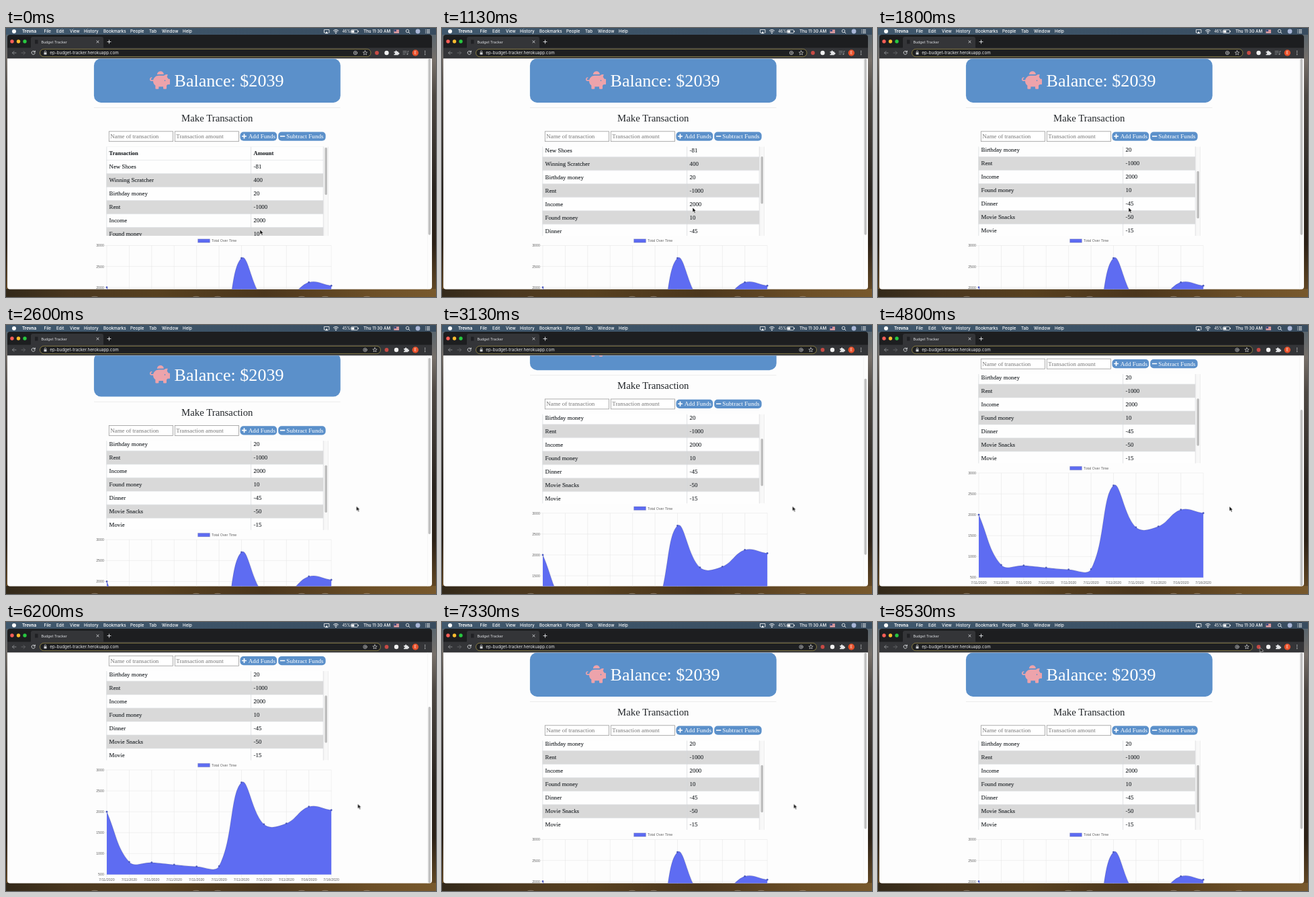
An HTML page for the animation above (8600 ms loop, 640 by 400 pixels).

```html
<!DOCTYPE html>
<html lang="en">
<head>
<meta charset="utf-8">
<title>Budget Tracker</title>
<style>
@property --page { syntax: "<number>"; inherits: true; initial-value: 0; }
@property --list { syntax: "<number>"; inherits: true; initial-value: 0; }

html, body { margin: 0; width: 100%; height: 100%; overflow: hidden; background: #2c2418; }
svg { display: block; width: 640px; height: 400px; }
text { white-space: pre; }

#stage { animation: page 8.6s linear infinite, list 8.6s linear infinite; }
#page { transform: translateY(calc(var(--page) * -1px)); }
#pageThumb { transform: translateY(calc(var(--page) * .777px)); }
#rows { transform: translateY(calc(var(--list) * -1px)); }
#listThumb { transform: translateY(calc(var(--list) * .538px)); }
#cursor { animation: cursor 8.6s linear infinite; }
.early { animation: early 8.6s step-end infinite; }
.late { animation: late 8.6s step-end infinite; }

@keyframes page {
  0%, 29.42% { --page: 0; }
  33.26% { --page: 20; }
  34.88% { --page: 30; }
  36.4% { --page: 43.7; }
  37.9% { --page: 59; }
  40.23%, 41.86% { --page: 64; }
  44.88% { --page: 81; }
  48.84% { --page: 100; }
  51.86%, 79.77% { --page: 103.5; animation-timing-function: ease-out; }
  84.42%, 100% { --page: 0; }
}
@keyframes list {
  0%, 10.81% { --list: 0; animation-timing-function: ease-out; }
  20.12%, 100% { --list: 65; }
}
@keyframes cursor {
  0%, .7% { transform: translate(378px, 300px); }
  4.65%, 20.93% { transform: translate(373px, 267px); animation-timing-function: ease-in-out; }
  26.28%, 36.4% { transform: translate(521.5px, 269.5px); }
  39.5%, 63.5% { transform: translate(523px, 269.7px); }
  69%, 89.88% { transform: translate(523.5px, 270.5px); animation-timing-function: ease-in-out; }
  99.19%, 100% { transform: translate(568.5px, 38px); }
}
@keyframes early { 0% { visibility: visible; } 29.42%, 100% { visibility: hidden; } }
@keyframes late { 0% { visibility: hidden; } 29.42%, 100% { visibility: visible; } }

.ui { font-family: Inter, Roboto, sans-serif; font-size: 6.25px; }
.ui .small { font-size: 5.5px; }
.serif { font-family: "Liberation Serif", "Times New Roman", serif; font-size: 8.9px; fill: #212529; }
#rows text { stroke: #212529; stroke-width: .12; }
.chart { font-family: "Liberation Sans", Arial, sans-serif; font-size: 5.33px; fill: #666; }
.line { fill: none; stroke: #d0d2d5; stroke-width: 1; stroke-linecap: round; }
.edge { stroke: #000; stroke-opacity: .1; stroke-width: 1.3; }
</style>
</head>
<body>
<svg id="stage" viewBox="0 0 640 400">
  <defs>
    <linearGradient id="bar">
      <stop offset="0" stop-color="#40586d"/>
      <stop offset="1" stop-color="#384c5f"/>
    </linearGradient>
    <linearGradient id="side" x2="0" y2="1">
      <stop offset="0" stop-color="#52636f"/>
      <stop offset=".12" stop-color="#77706a"/>
      <stop offset=".25" stop-color="#4e4843"/>
      <stop offset=".6" stop-color="#2a241f"/>
      <stop offset=".8" stop-color="#2c2117"/>
      <stop offset="1" stop-color="#6a4d26"/>
    </linearGradient>
    <linearGradient id="floor">
      <stop offset="0" stop-color="#33291a"/>
      <stop offset=".15" stop-color="#4a371f"/>
      <stop offset=".35" stop-color="#57401f"/>
      <stop offset=".6" stop-color="#4b361c"/>
      <stop offset=".85" stop-color="#6c4f27"/>
      <stop offset="1" stop-color="#78592d"/>
    </linearGradient>
    <clipPath id="win"><rect x="2" y="10" width="632" height="378.5" rx="4"/></clipPath>
    <clipPath id="view"><rect x="2" y="45.400" width="632" height="344"/></clipPath>
    <clipPath id="box"><rect x="149" y="176.5" width="332" height="132.5"/></clipPath>
  </defs>

  <rect width="640" height="400" fill="url(#side)"/>
  <rect y="388" width="640" height="12" fill="url(#floor)"/>
  <g id="dock" fill="#c9c0bc"></g>

  <!-- menu bar -->
  <rect width="640" height="10" fill="url(#bar)"/>
  <g id="menu" class="ui" fill="#fff">
    <circle cx="12" cy="5" r="3"/>
    <text class="early small" x="500.500" y="7">46%</text>
    <text class="late small" x="500.500" y="7">45%</text>
    <path d="M473.500 7V2.500h7.500V7h-1M475 7h-1.500" fill="none" stroke="#fff" stroke-width=".8"/>
    <path d="M477.200 5l2.400 3.200h-4.800z"/>
    <path d="M487.200 4.200a5.400 5.400 0 0 1 7.600 0M488.700 5.800a3.300 3.300 0 0 1 4.600 0" fill="none" stroke="#fff"/>
    <circle cx="491" cy="7.400" r=".9"/>
    <rect x="513.500" y="2.700" width="10" height="4.800" rx="1" fill="none" stroke="#fff" stroke-width=".7"/>
    <rect x="514.300" y="3.500" width="4" height="3.200"/>
    <rect x="524.200" y="4.200" width=".8" height="1.800"/>
    <rect x="577.500" y="2.600" width="7.500" height="5" fill="#eee"/>
    <path d="M577.500 3h7.500M577.500 4.400h7.500M577.500 5.800h7.500M577.500 7.200h7.500" stroke="#c5404a" stroke-width=".7"/>
    <rect x="577.500" y="2.600" width="3.500" height="2.600" fill="#34477e"/>
    <circle cx="597.500" cy="4.500" r="2.200" fill="none" stroke="#fff" stroke-width=".8"/>
    <path d="M599.200 6.200l2 2M624 2.800h1m1 0h5M624 5h1m1 0h5M624 7.200h1m1 0h5" stroke="#fff" stroke-width=".9"/>
    <circle cx="613" cy="5" r="3.400" fill="#a9b6d6"/>
  </g>

  <g clip-path="url(#win)">
    <!-- tab strip and toolbar -->
    <rect x="2" y="10" width="632" height="21" fill="#1d1e20"/>
    <path d="M34 31q3 0 3-3V16q0-3 3-3h102q3 0 3 3v12q0 3 3 3z" fill="#343538"/>
    <rect x="2" y="29.500" width="632" height="16" fill="#343538"/>
    <circle cx="9" cy="20" r="2.700" fill="#ff5f57"/>
    <circle cx="18.500" cy="20" r="2.700" fill="#febc2e"/>
    <circle cx="28" cy="20" r="2.700" fill="#28c840"/>
    <rect x="43" y="17.500" width="4.500" height="6" fill="#202124"/>
    <text class="ui" x="52.500" y="22.900" style="font-size:5.300px" fill="#dfe1e5">Budget Tracker</text>
    <path class="line" stroke-width=".8" d="M135 19l3 3m0-3l-3 3M153.500 18v5m-2.500-2.500h5"/>
    <path class="line" style="stroke:#85878a" d="M15 37H9.500M12 34.500L9.500 37l2.500 2.500"/>
    <path class="line" style="stroke:#606265" d="M23 37h5.500M26 34.500l2.500 2.500-2.500 2.500"/>
    <path class="line" d="M42.800 35.200a2.600 2.600 0 1 0 .4 2.400M43.300 34v2h-2"/>
    <g fill="#1e1f21" stroke="#857b45" stroke-width="1">
      <rect class="early" x="50.500" y="31.300" width="492.500" height="11.400" rx="5.700"/>
      <rect class="late" x="50.500" y="31.300" width="507" height="11.400" rx="5.700"/>
    </g>
    <rect x="56.500" y="36.200" width="4" height="3.400" rx=".5" fill="#d0d2d5"/>
    <path class="line" style="stroke-width:.7" d="M57.300 36v-1a1.200 1.200 0 0 1 2.400 0v1"/>
    <text class="ui" x="65.300" y="39.100" fill="#e8eaed">ep-budget-tracker.herokuapp.com</text>
    <g class="early">
      <g transform="translate(-14.500 0)"><g id="tools">
        <circle class="line" cx="534.500" cy="37" r="2.700" style="stroke-width:.7"/>
        <path class="line" style="stroke-width:.7" d="M533.300 37h2.400m-1.200-1.200v2.400"/>
        <path class="line" style="stroke-width:.7" d="M549 33.700l.9 2.200 2.300.2-1.800 1.500.6 2.300-2-1.300-2 1.300.6-2.300-1.800-1.500 2.300-.2z"/>
        <circle cx="566.500" cy="37" r="2.900" fill="#c84a45"/>
        <circle cx="581" cy="37" r="3.200" fill="#f1f1f1"/>
        <path d="M592 35h2a1.200 1.200 0 1 1 2.300 0h2v1.800a1.200 1.200 0 1 1 0 2.200v1.200h-6.300v-1.600a1.100 1.100 0 1 0 0-2z" fill="#e4e5e7"/>
      </g></g>
      <path class="line" style="stroke-width:.8;stroke:#8f9194" d="M591 34.500h5M591 36.700h5M591 39h3M598 38.800V34.500h1.200"/>
      <circle cx="597.300" cy="39" r="1" fill="#8f9194"/>
    </g>
    <g class="late"><use href="#tools"/></g>
    <circle cx="609.300" cy="37" r="4.700" fill="#e8502a"/>
    <text class="ui" x="609.300" y="39" text-anchor="middle" style="font-size:5.500px" fill="#fff">E</text>
    <g fill="#d0d2d5"><circle cx="623.700" cy="34.500" r=".7"/><circle cx="623.700" cy="37" r=".7"/><circle cx="623.700" cy="39.500" r=".7"/></g>

    <!-- web page -->
    <rect x="2" y="45.400" width="632" height="344" fill="#fdfdfd"/>
    <g clip-path="url(#view)">
      <g id="page">
        <rect x="130.900" y="45.500" width="366.900" height="65.400" rx="10.500" fill="#5b90ca"/>
        <g transform="translate(214 64) scale(.0521)" fill="#eda3ab">
          <path d="M208 102a96 96 0 1 1 192-5q-8-1-16-1H256q-24 0-48 6z"/>
          <path d="M560 224h-30q-13-30-37-52l19-76h-32q-45 0-73 34-11-2-23-2H256c-77 0-142 55-157 128H56c-34 0-34-48 2-48 6 0 6-2 6-6v-20q0-6-6-6c-76 0-80 112-2 112h40c0 52 25 98 64 127v81q0 16 16 16h64q16 0 16-16v-48h128v48q0 16 16 16h64q16 0 16-16v-81q18-13 31-31h49q16 0 16-16V240q0-16-16-16z"/>
          <circle cx="432" cy="272" r="16" fill="#5b90ca"/>
        </g>
        <path d="M131 118.500h366.500" stroke="#e7e7e7" stroke-width=".8"/>
        <g class="serif">
          <text x="250.500" y="87.200" style="font-size:26.100px;fill:#fff">Balance: $2039</text>
          <text x="314.300" y="139" text-anchor="middle" style="font-size:14.800px">Make Transaction</text>
          <g fill="#fff" stroke="#9a9a9a" stroke-width=".8">
            <rect x="153.300" y="153.800" width="95.200" height="14.900"/>
            <rect x="251.300" y="153.800" width="95.200" height="14.900"/>
          </g>
          <text x="155.300" y="164.200" style="fill:#777">Name of transaction</text>
          <text x="253.300" y="164.200" style="fill:#777">Transaction amount</text>
          <rect x="348.500" y="154.500" width="54.700" height="13.300" rx="5" fill="#5b90ca"/>
          <rect x="405.200" y="154.500" width="70.500" height="13.300" rx="5" fill="#5b90ca"/>
          <path d="M351 161h7m-3.500-3.500v7M408 161h7.300" stroke="#fff" stroke-width="1.700"/>
          <text x="360.800" y="164.100" style="fill:#fff;font-size:9.100px">Add Funds</text>
          <text x="417.300" y="164.100" style="fill:#fff;font-size:9.200px">Subtract Funds</text>
        </g>
        <g clip-path="url(#box)">
          <g id="rows" class="serif"></g>
          <rect x="472.700" y="176.500" width="7" height="132.500" fill="#f8f8f8"/>
          <path d="M472.800 176v134M479.500 176v134" stroke="#e4e4e4" stroke-width=".6"/>
          <rect id="listThumb" x="474.500" y="177.700" width="3.500" height="70.500" rx="1.750" fill="#bdbdbd"/>
        </g>
        <g id="chart" class="chart"></g>
      </g>
      <path d="M627.500 45v344" stroke="#ececec" stroke-width=".5"/>
      <rect id="pageThumb" x="628.500" y="45.700" width="3.600" height="262" rx="1.800" fill="#c1c1c1"/>
    </g>
  </g>

  <path id="cursor" d="M0 0v7l1.700-1.500 1.200 2.700 1.300-.6-1.200-2.600h2.200z" fill="#111" stroke="#fff" stroke-width=".5"/>
</svg>

<script>
const NS = "http://www.w3.org/2000/svg";
const $ = id => document.getElementById(id);

function add(parent, tag, attrs, text) {
  const el = document.createElementNS(NS, tag);
  for (const key in attrs) el.setAttribute(key, attrs[key]);
  if (text !== undefined) el.textContent = text;
  parent.append(el);
  return el;
}

// menu titles
const menu = { Trevna: 24, File: 56.5, Edit: 75, View: 95, History: 116, Bookmarks: 145,
  People: 185, Tab: 213, Window: 232, Help: 263, "Thu 11:30 AM": 532 };
for (const name in menu)
  add($("menu"), "text", { x: menu[name], y: 7.2, "font-weight": menu[name] === 24 ? 700 : 500 }, name);

for (const x of [132, 283, 315, 440, 475, 537])
  add($("dock"), "ellipse", { cx: x, cy: 400.3, rx: 5, ry: 1.6, opacity: .4 });

// transactions, newest first
const entries = [["New Shoes", -81], ["Winning Scratcher", 400], ["Birthday money", 20],
  ["Rent", -1000], ["Income", 2000], ["Found money", 10], ["Dinner", -45],
  ["Movie Snacks", -50], ["Movie", -15], ["Bills", -1200], ["Paycheck", 2000]];
const rows = $("rows");
[["Transaction", "Amount"], ...entries].forEach(([name, amount], i) => {
  const y = 176.5 + i * 20;
  const weight = i ? 400 : 700;
  const size = `font-size:${i ? 8.9 : 8.5}px`;
  add(rows, "rect", { x: 149.5, y, width: 323, height: 20, fill: i && i % 2 === 0 ? "#d9d9d9" : "#fefefe" });
  add(rows, "path", { d: `M149.500 ${y}h323`, stroke: "#dcdfe2", "stroke-width": .6 });
  add(rows, "text", { x: 153.5, y: y + 12.8, "font-weight": weight, style: size }, name);
  add(rows, "text", { x: 368.5, y: y + 12.8, "font-weight": weight, style: size }, amount);
});
add(rows, "path", { d: "M149.800 176.500v240M364.600 176.500v240M472.300 176.500v240", stroke: "#d5d8db", "stroke-width": .7 });

// area chart of the running total
const chart = $("chart");
const left = 150, ceiling = 323.5, step = 33.42, floor = 479;
const yOf = v => floor - (v - 500) / 2500 * (floor - ceiling);
let total = 0;
const pts = entries.slice().reverse().map(([, amount], i) => ({ x: left + i * step, y: yOf(total += amount) }));

for (let v = 500; v <= 3000; v += 500) {
  add(chart, "path", { d: `M${left - 4.4} ${yOf(v)}H484.200`, stroke: "#e3e3e3", "stroke-width": .5 });
  add(chart, "text", { x: 146, y: yOf(v) + 1.9, "text-anchor": "end" }, v);
}
pts.forEach((p, i) => {
  add(chart, "path", { d: `M${p.x} ${ceiling}V${floor + 4.4}`, stroke: "#e3e3e3", "stroke-width": .5 });
  add(chart, "text", { x: p.x, y: 488.5, "text-anchor": "middle" }, i < 9 ? "7/11/2020" : "7/16/2020");
});

// spline handles with tension 0.4, kept inside the plot
const clampY = y => Math.min(floor, Math.max(ceiling, y));
function handles(i) {
  const p = pts[i], a = pts[i - 1] || p, b = pts[i + 1] || p;
  const da = Math.hypot(p.x - a.x, p.y - a.y), db = Math.hypot(b.x - p.x, b.y - p.y);
  const at = k => `${p.x + k * (b.x - a.x)} ${clampY(p.y + k * (b.y - a.y))}`;
  return { before: at(-.4 * da / (da + db)), after: at(.4 * db / (da + db)) };
}
let curve = `M${pts[0].x} ${pts[0].y}`;
for (let i = 1; i < pts.length; i++)
  curve += `C${handles(i - 1).after} ${handles(i).before} ${pts[i].x} ${pts[i].y}`;
const blue = "#5e6cf2";
add(chart, "path", { d: `${curve}V${floor}H${left}Z`, fill: blue });
add(chart, "path", { d: curve, fill: "none", class: "edge" });
for (const p of pts)
  add(chart, "circle", { cx: p.x, cy: p.y, r: 1.4, fill: "#4c5abf" });

add(chart, "rect", { x: 285.6, y: 313.8, width: 17.8, height: 5.3, fill: blue, class: "edge" });
add(chart, "text", { x: 306, y: 318.4 }, "Total Over Time");
</script>
</body>
</html>
```
